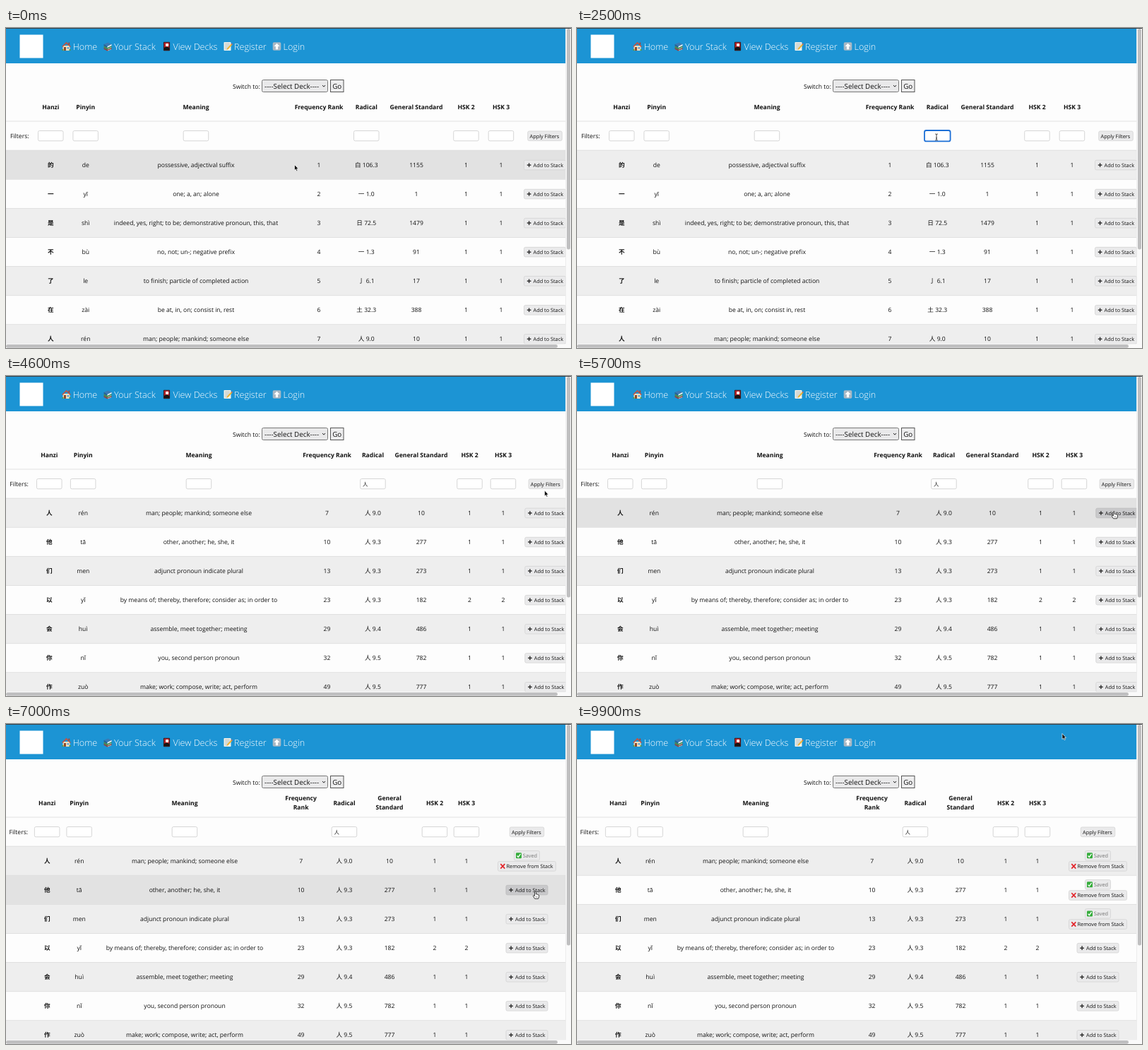
Recreate the animation shown at these times as an HTML page. Size 800 by 453 pixels, loop 10000 ms.

```html
<!DOCTYPE html>
<html lang="en">
<head>
<meta charset="utf-8">
<title>Character table</title>
<style>
html, body { margin: 0; width: 100%; height: 100%; overflow: hidden; background: #fdfdfd; }
svg { display: block; width: 800px; height: 453px; }
text { font-family: "Open Sans", "Noto Sans", "Noto Sans CJK SC", "Noto Sans CJK", sans-serif; text-rendering: geometricPrecision; white-space: pre; }
.status { font-family: Inter, "Open Sans", sans-serif; }
</style>
</head>
<body>
<svg id="stage" viewBox="0 0 800 453"></svg>
<script>
const LOOP = 10000, STEP = 100;
const ROW_TOP = 173, ROW_H = 41.1;
const FOCUS = 1500, TYPED = 3000, PRESS = 3700, LOADED = 4300;
const SAVED_AT = [6100, 7600, 9000];

const HEADS = ['Hanzi', 'Pinyin', 'Meaning', 'Frequency Rank', 'Radical', 'General Standard', 'HSK 2', 'HSK 3'];
const INPUT_COLUMNS = [0, 1, 2, 4, 6, 7];
const LAYOUTS = {
  all: { x: [63.3, 112.7, 269, 443, 510.3, 581, 651.5, 701], action: 763, left: 6 },
  filtered: { x: [61.3, 109.2, 273, 454.5, 519.5, 588, 656.5, 704], action: 764.3, left: 5.3 },
  saved: { x: [58.2, 103.7, 253, 417.6, 479, 543, 607, 652], action: 737.5, left: 4.5, wrap: true }
};
const parse = s => s.trim().split('\n').map(line => line.split('|'));
const ALL_ROWS = parse(`
的|de|possessive, adjectival suffix|1|白 106.3|1155|1|1
一|yī|one; a, an; alone|2|一 1.0|1|1|1
是|shì|indeed, yes, right; to be; demonstrative pronoun, this, that|3|日 72.5|1479|1|1
不|bù|no, not; un-; negative prefix|4|一 1.3|91|1|1
了|le|to finish; particle of completed action|5|亅 6.1|17|1|1
在|zài|be at, in, on; consist in, rest|6|土 32.3|388|1|1
人|rén|man; people; mankind; someone else|7|人 9.0|10|1|1`);
const PERSON_ROWS = parse(`
人|rén|man; people; mankind; someone else|7|人 9.0|10|1|1
他|tā|other, another; he, she, it|10|人 9.3|277|1|1
们|men|adjunct pronoun indicate plural|13|人 9.3|273|1|1
以|yǐ|by means of; thereby, therefore; consider as; in order to|23|人 9.3|182|2|2
会|huì|assemble, meet together; meeting|29|人 9.4|486|1|1
你|nǐ|you, second person pronoun|32|人 9.5|782|1|1
作|zuò|make; work; compose, write; act, perform|49|人 9.5|777|1|1`);

// time, x, y of the pointer's hot spot
const PATH = [
  [0, 408.5, 193.5], [300, 408.5, 193.5], [1100, 509, 154], [3100, 509, 154],
  [3600, 763, 156.5], [4400, 763, 156.5], [5200, 760.3, 192], [6200, 760.3, 192],
  [6800, 749.5, 237.5], [7700, 749.5, 237.5], [8100, 741.5, 259.5],
  [8500, 748, 274], [9200, 748, 274], [9800, 687, 13.5], [LOOP, 687, 13.5]
];

function pointerAt(t) {
  const i = PATH.findIndex(p => p[0] > t);
  const [t0, x0, y0] = PATH[i - 1], [t1, x1, y1] = PATH[i];
  const u = (t - t0) / (t1 - t0), e = u * u * (3 - 2 * u);
  return { x: x0 + (x1 - x0) * e, y: y0 + (y1 - y0) * e };
}

const rect = (x, y, w, h, fill, extra = '') =>
  `<rect x="${x}" y="${y}" width="${w}" height="${h}" fill="${fill}" ${extra}/>`;
const path = (d, fill, extra = '') => `<path d="${d}" fill="${fill}" ${extra}/>`;
const line = (d, color, width) => path(d, 'none', `stroke="${color}" stroke-width="${width}"`);
const at = (x, y, body) => `<g transform="translate(${x} ${y})">${body}</g>`;

// y is the middle of the capitals
function text(s, x, y, { size = 8.6, weight = 400, anchor = 'start', fill = '#111', cls = '' } = {}) {
  return `<text class="${cls}" x="${x}" y="${y + size * 0.357}" font-size="${size}" font-weight="${weight}" text-anchor="${anchor}" fill="${fill}">${s}</text>`;
}
const centered = (s, x, y, style = {}) => text(s, x, y, { anchor: 'middle', ...style });

// small icons, centred on the origin
const ICONS = {
  home: path('M-5 -1h10v7h-10z', '#f1dfc0') + path('M-6.3 0L0 -6.3 6.3 0 5.2 1 0 -4 -5.2 1z', '#c9503c') +
    rect(3, -5.5, 1.6, 3, '#a94332') + rect(-3.6, 1, 3, 5, '#8a4a2b') + rect(1, 1, 2.8, 2.6, '#63a9d8') +
    path('M-6 4h2v2h-2zM4 4h2v2h-2z', '#58993f'),
  books: path('M-5.5 -3l6 -2.5 5 2.5 -6 3z', '#397bb5') + path('M-5.5 -3l5 3v2l-5 -3z', '#285b8d') +
    path('M-.5 0l6 -3v2l-6 3z', '#eee') + path('M-5.5 -.5l5 2.7 6 -2.7v2l-6 3 -5 -3z', '#4f8a3c') +
    path('M-5.5 2l5 2.7 6 -2.7v2l-6 2.4 -5 -2.6z', '#9c3935') + line('M0 3.8l5 -2.3M0 6l5 -2', '#e9dfce', .7),
  card: rect(-4.6, -6.3, 9.2, 12.6, '#2a1a1c', 'rx="1"') + rect(-3.7, -5.4, 7.4, 10.8, '#b8242c') +
    path('M-3.7 5.4v-3.4q3.7 -3 7.4 0v3.4z', '#151515') + '<circle cx=".6" cy="-2" r="2.2" fill="#f5eee9"/>',
  memo: rect(-5.5, -6, 10, 12, '#f5f3ea', 'rx=".7"') +
    line('M-4 -4h7M-4 -2h7M-4 0h7M-4 2h5M-4 4h4', '#9aa6ad', .7) +
    path('M-1.5 4.8l.6 -2 5.5 -6 1.5 1.3 -5.5 6z', '#f0b32d') + path('M4.6 -3.2l1 -1.1 1.5 1.3 -1 1.1z', '#d8655e'),
  up: rect(-5.8, -5.8, 11.6, 11.6, '#a9b8c4', 'rx="1.8"') +
    path('M0 -4.3L4 0H1.6V4.2H-1.6V0H-4z', '#fff'),
  plus: line('M-2.8 0H2.8M0 -2.8V2.8', '#333', 1.5),
  check: rect(-4, -4, 8, 8, '#36ad3c', 'rx="1.2"') + line('M-2.4 .2L-.7 2.2 2.6 -2.4', '#fff', 1.3),
  cross: line('M-3 -3.2L3 3.2M3 -3.2L-3 3.2', '#e3252b', 1.7)
};

const ARROW = path('M0 0V8L1.8 6.4 3 9.2 4.4 8.6 3.2 5.9H5.5z', '#000', 'stroke="#fff" stroke-width=".7"');
const HAND = path('M-1 .2Q0 -1 .9 .2V3.5Q1.9 2.8 2.6 3.8 3.7 3.2 4.2 4.4 5.2 4.2 5.2 5.4V7L4.2 9.8H-.8L-3 6.3Q-3.2 5 -2 5.2L-1 6.1z', '#fff', 'stroke="#111" stroke-width=".8"') +
  line('M1 6.3v2M2.6 6.3v2', '#444', .5);
const IBEAM = line('M-1.8 -4Q0 -4 0 -3V4Q0 5 -1.8 5M1.8 -4Q0 -4 0 -3M0 4Q0 5 1.8 5M-1 2H1', '#111', .8);

function navBar() {
  const links = [['home', 'Home', 85.5, 94.8], ['books', 'Your Stack', 144, 153], ['card', 'View Decks', 227.5, 236.5],
    ['memo', 'Register', 314, 323], ['up', 'Login', 383.5, 392.5]];
  return rect(0, 0, 792.5, 50, '#1c94d4') + rect(19.5, 9.5, 33, 33, '#fff') +
    links.map(([icon, label, ix, tx]) => at(ix, 26, ICONS[icon]) +
      text(label, tx, 26.2, { size: 12.6, weight: 300, fill: '#fff' })).join('');
}

function deckPicker() {
  return text('Switch to:', 321, 82.5) +
    rect(362.5, 73.5, 93, 17, '#e9e9ea', 'rx="2" stroke="#777"') +
    text('----Select Deck----', 366, 82.3, { size: 9.8 }) +
    line('M448 81l2 2.2 2 -2.2', '#222', 1) +
    rect(459.5, 73.5, 18.5, 17, '#ededee', 'stroke="#555"') +
    centered('Go', 468.7, 82.3, { size: 9.8 });
}

function tableHead(layout, t) {
  let out = HEADS.map((head, i) => {
    const words = head.split(' '), bold = { weight: 700 };
    if (!layout.wrap || head.length < 10) return centered(head, layout.x[i], 111.5, bold);
    return words.map((w, k) => centered(w, layout.x[i], 105 + 13 * k, bold)).join('');
  }).join('');
  out += rect(0, 131.5, 792.5, 1, '#e2e2e2') + text('Filters:', layout.left, 153);
  for (const c of INPUT_COLUMNS) {
    const x = layout.x[c] - 17.8;
    const focused = c === 4 && t >= FOCUS && t < PRESS;
    out += focused
      ? rect(x - .5, 145, 36.6, 15.4, '#fff', 'rx="2.5" stroke="#1c6fd6" stroke-width="1.8"')
      : rect(x, 145.5, 35.5, 14.3, '#fff', 'rx="2" stroke="#d2d2d2" stroke-width=".9"');
    if (c === 4 && t >= TYPED) out += text('人', x + 3.2, 153, { size: 7.4 });
  }
  return out;
}

function actions(layout, t, rows) {
  const mid = layout.action, list = [];
  const add = (w, y, label, tx, icon, ix, muted) =>
    list.push({ x: mid - w / 2, y: y - 6.8, w, h: 13.6, mid: y, label, tx: mid + tx, icon, ix: mid + ix, muted });
  add(48.5, 152.8, 'Apply Filters', -21.5);
  rows.forEach((row, i) => {
    const y = 194 + 41.05 * i;
    if (t >= LOADED && t >= SAVED_AT[i]) {
      add(36, y - 7.7, 'Saved', -5.8, 'check', -11.5, true);
      add(82, y + 7.4, 'Remove from Stack', -29, 'cross', -34.2);
    } else add(59, y, 'Add to Stack', -16.5, 'plus', -22.4);
  });
  return list;
}

function drawButton(b, hot) {
  return rect(b.x, b.y, b.w, b.h, hot ? '#c9c9cb' : '#eaeaeb', `rx="2" stroke="${hot ? '#bcbcbc' : '#d3d3d3'}" stroke-width=".8"`) +
    (b.icon ? at(b.ix, b.mid, ICONS[b.icon]) : '') +
    text(b.label, b.tx, b.mid + .1, { size: 7.35, fill: b.muted ? '#777' : '#111' });
}

function scrollBars() {
  return rect(792.5, 0, 7.5, 453, '#fafafa') + rect(0, 447.3, 800, 5.7, '#fafafa') +
    rect(792.2, 0, .6, 447, '#e4e4e4') +
    rect(794, 1, 5, 312.5, '#bfbfc0', 'rx="2.5"') + rect(0, 448, 781, 4.8, '#bfbfc0', 'rx="2.4"');
}

function render(t) {
  const rows = t < LOADED ? ALL_ROWS : PERSON_ROWS;
  const layout = t < LOADED ? LAYOUTS.all : t < SAVED_AT[0] ? LAYOUTS.filtered : LAYOUTS.saved;
  const { x, y } = pointerAt(t);
  const buttons = actions(layout, t, rows);
  const hot = buttons.find(b => !b.muted && x > b.x && x < b.x + b.w && y > b.y && y < b.y + b.h);
  const hotRow = Math.floor((y - ROW_TOP) / ROW_H);
  const radicalX = layout.x[4];
  const overInput = Math.abs(x - radicalX) < 18 && y > 145 && y < 160;

  let out = rect(0, 0, 800, 453, '#fdfdfd') + navBar() + deckPicker() + tableHead(layout, t);
  rows.forEach((row, i) => {
    const top = ROW_TOP + ROW_H * i;
    out += rect(0, top, 792.5, ROW_H, i === hotRow ? '#e2e2e2' : i % 2 ? '#fdfdfd' : '#eeeeee') +
      rect(0, top - .3, 792.5, .9, '#dedede');
    row.forEach((cell, c) => out += centered(cell, layout.x[c], 194 + 41.05 * i, { weight: c ? 400 : 700 }));
  });
  out += buttons.map(b => drawButton(b, b === hot)).join('') + scrollBars() + rect(0, 0, 800, 1, '#3b3f42');
  if (t >= PRESS && t < LOADED) {
    out += rect(0, 444, 133.5, 9, '#3a3a3b', 'rx="1"') +
      text('hanzi-stack.onrender.com', 2, 449.2, { size: 6.1, weight: 500, fill: '#f2f2f2', cls: 'status' });
  }
  return out + at(x, y, hot ? HAND : overInput ? IBEAM : ARROW);
}

const stage = document.getElementById('stage');
const start = performance.now();
let shown = -1;
function tick() {
  const t = Math.floor((performance.now() - start) % LOOP / STEP) * STEP;
  if (t !== shown) stage.innerHTML = render(shown = t);
  requestAnimationFrame(tick);
}
tick();
</script>
</body>
</html>
```
